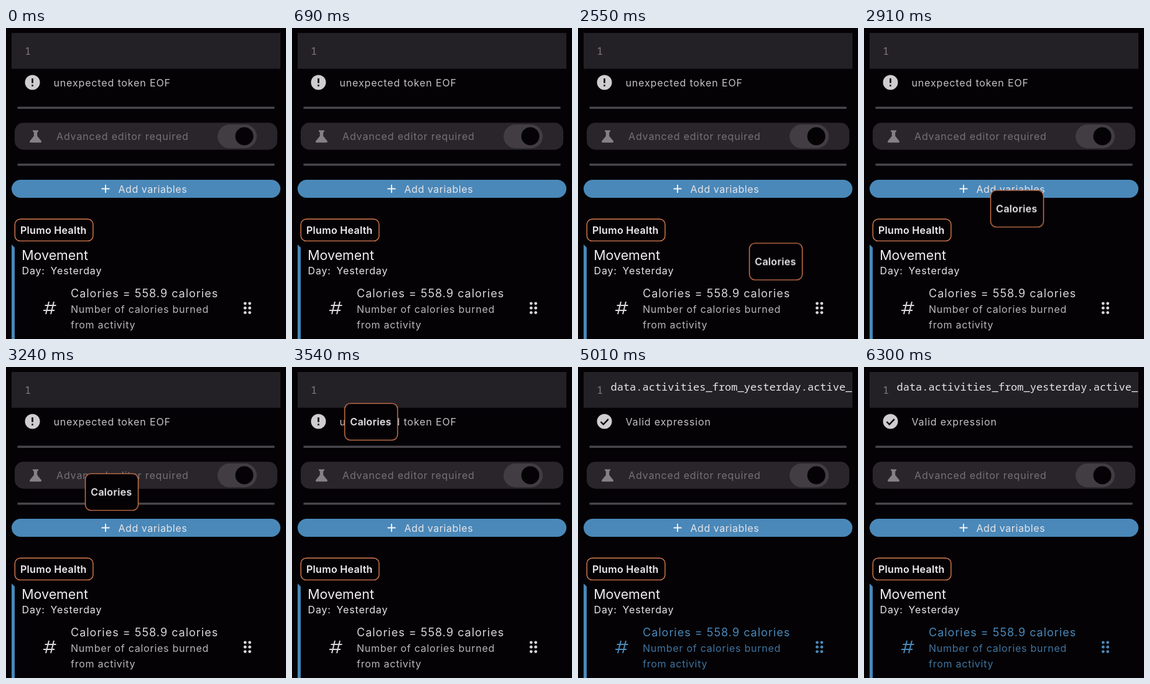
Write an HTML page that moves like this. It is 450 px wide and 500 px high and loops after 7080 ms.

```html
<!DOCTYPE html>
<html lang="en">
<head>
<meta charset="utf-8">
<title>Drag a variable into the editor</title>
<style>
  html, body { margin: 0; width: 100%; height: 100%; overflow: hidden; background: #040205; }
  svg { display: block; width: 450px; height: 500px; }
  text { font: 400 16px Inter, sans-serif; letter-spacing: .85px; fill: #c4c2c5; white-space: pre; }
  .label { font-weight: 600; letter-spacing: .3px; fill: #f0eef0; }
  .mono { font: 400 17px "Noto Sans Mono", monospace; letter-spacing: 0; }
  .title { font-size: 21.4px; letter-spacing: 0; fill: #f0eef0; }
  .bright { fill: #e6e4e7; }
  .box { fill: #040205; stroke: #d97b52; stroke-width: 1.4; }

  .ripple, .chip, .before, .after, .code, .item { animation: 7080ms linear infinite; }
  .ripple { animation-name: ripple; transform-origin: 388px 450px; }
  .chip { animation-name: drag; }
  .before { animation-name: before; }
  .after { animation-name: after; }
  .code { animation-name: code; }
  .item { animation-name: tint; color: #d8d6d9; }
  .item text, .item circle { fill: currentColor; }
  .item .note { opacity: .86; letter-spacing: .75px; }

  @keyframes ripple {
    0%, 20.3% { opacity: 0; transform: scale(.6); }
    25.4%, 30.5% { opacity: 1; transform: none; }
    30.51%, 100% { opacity: 0; transform: none; }
  }
  @keyframes drag {
    0%, 30.5% { opacity: 0; transform: translate(345px, 419px); }
    30.51% { opacity: 1; transform: translate(345px, 419px); }
    36.02% { transform: translate(275px, 345.5px); }
    40.25% { transform: translate(217px, 277px); }
    45.76% { transform: translate(127px, 171.2px); }
    50.42% { transform: translate(80px, 47px); }
    54.66%, 66.52% { opacity: 1; transform: translate(65px, 3.8px); }
    66.53%, 100% { opacity: 0; transform: translate(65px, 3.8px); }
  }
  @keyframes code {
    0%, 66.52% { opacity: 0; }
    66.53%, 100% { opacity: 1; }
  }
  @keyframes before {
    0%, 67.79% { opacity: 1; }
    67.8%, 100% { opacity: 0; }
  }
  @keyframes after {
    0%, 67.79% { opacity: 0; }
    67.8%, 100% { opacity: 1; }
  }
  @keyframes tint {
    0%, 67.79% { color: #d8d6d9; }
    67.8%, 100% { color: #4a88b9; }
  }
</style>
</head>
<body>
<svg viewBox="0 0 450 500">
  <rect width="450" height="500" fill="#040205"/>

  <!-- Editor -->
  <rect x="9" y="8" width="432" height="57.6" fill="#242126"/>
  <text class="mono" x="30" y="42.7" style="fill:#7f7b80">1</text>
  <text class="mono bright code" x="52.5" y="38">data.activities_from_yesterday.active_</text>

  <!-- Status -->
  <circle cx="42.5" cy="87.5" r="12" fill="#cfcdd0"/>
  <g class="before">
    <path d="M42.5 81v7.5M42.5 91.2v2.6" stroke="#040205" stroke-width="2.6"/>
    <text x="76.5" y="93.5">unexpected token EOF</text>
  </g>
  <g class="after">
    <path d="M36.5 88l4.3 4.3 8-8.4" fill="none" stroke="#040205" stroke-width="2.4"/>
    <text x="76.5" y="93.5">Valid expression</text>
  </g>

  <path d="M18.5 128.2H431.5M18.5 219.8H431.5" stroke="#48454a" stroke-width="3.6"/>

  <!-- Advanced editor switch -->
  <rect x="14" y="152.3" width="422" height="43.4" rx="14" fill="#29252a"/>
  <path d="M43 164.5h9v1.8l-1.8 1.5v6l6.6 8q.9 2.4-1.6 2.4h-15.4q-2.5 0-1.6-2.4l6.6-8v-6l-1.8-1.5z" fill="#848085"/>
  <text x="81" y="180.3" style="fill:#757176">Advanced editor required</text>
  <rect x="340" y="155" width="63" height="38.5" rx="19.25" fill="#413d43"/>
  <circle cx="383" cy="174" r="14.5" fill="#040205"/>

  <!-- Add button -->
  <rect x="9" y="244" width="432" height="29" rx="14.5" fill="#4a88b9"/>
  <path d="M153.5 258.5h13M160 252v13" stroke="#f4f2f4" stroke-width="1.9"/>
  <text class="bright" x="180.5" y="264.5" style="letter-spacing:.55px">Add variables</text>

  <!-- Variable group -->
  <rect class="box" x="14.3" y="307.2" width="125.6" height="35.2" rx="8.5"/>
  <text class="label" x="23" y="331">Plumo Health</text>
  <path d="M9 348l5 5v147h-5z" fill="#4a88b9"/>
  <text class="title" x="25.3" y="373">Movement</text>
  <text class="bright" x="25.5" y="396">Day:</text>
  <text class="bright" x="71.5" y="396">Yesterday</text>

  <circle class="ripple" cx="388" cy="450" r="24" fill="#2a272c"/>
  <g class="item">
    <path d="M62.5 446h18M60 454h18M69 440l-5 20M77 440l-5 20" stroke="currentColor" stroke-width="2"/>
    <text x="104" y="433" style="font-size:18px;letter-spacing:1px">Calories = 558.9 calories</text>
    <text class="note" x="104" y="458.3">Number of calories burned</text>
    <text class="note" x="104" y="482.7">from activity</text>
    <circle cx="384.3" cy="442.8" r="2.4"/><circle cx="391.7" cy="442.8" r="2.4"/>
    <circle cx="384.3" cy="450.2" r="2.4"/><circle cx="391.7" cy="450.2" r="2.4"/>
    <circle cx="384.3" cy="457.6" r="2.4"/><circle cx="391.7" cy="457.6" r="2.4"/>
  </g>

  <!-- Dragged variable -->
  <g class="chip">
    <rect class="box" x=".6" y=".6" width="85" height="59" rx="9"/>
    <text class="label" x="9.3" y="36">Calories</text>
  </g>
</svg>
</body>
</html>
```
